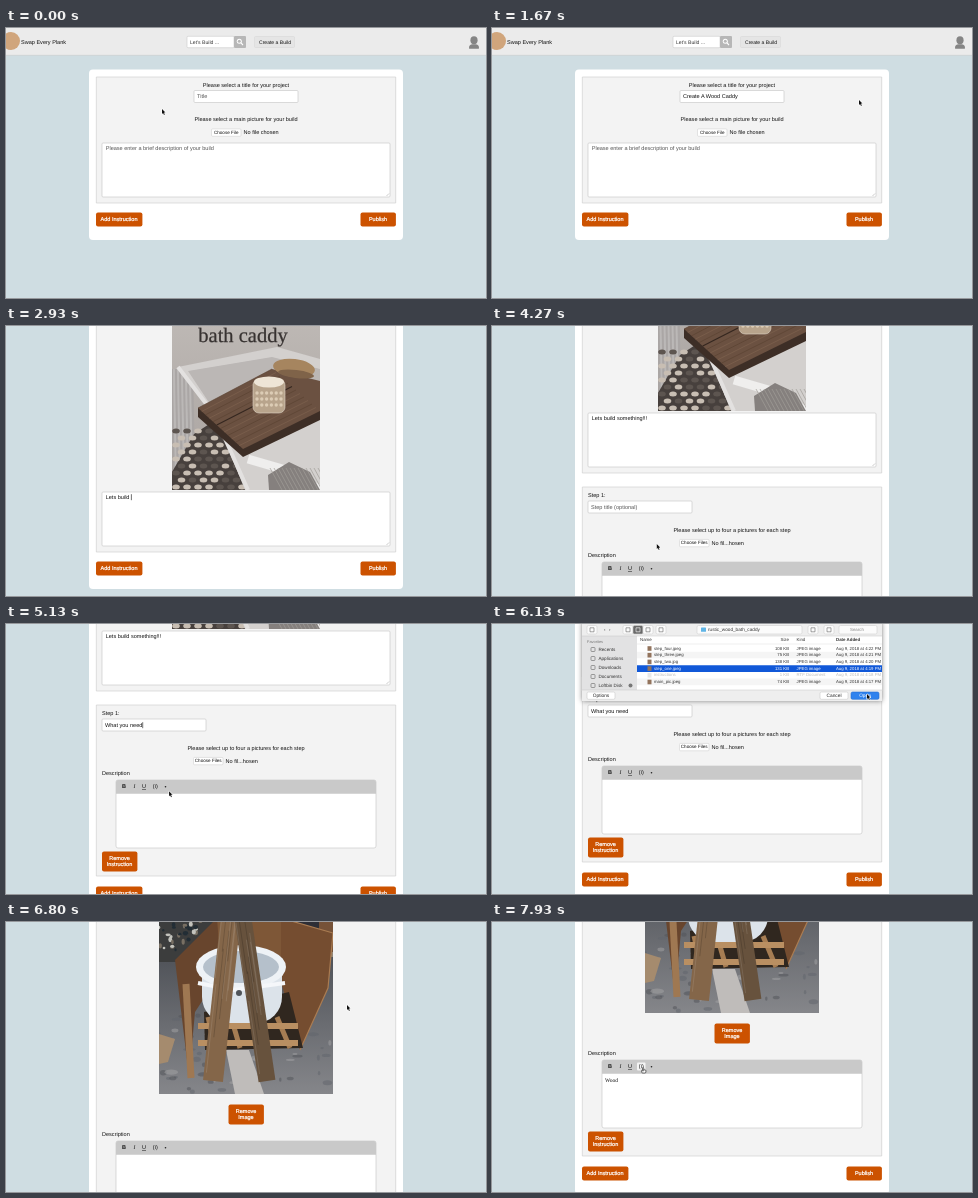
Recreate the animation shown at these times as an HTML page with a canvas. Size 480 by 270 pixels, loop 8000 ms.

```html
<!DOCTYPE html>
<html lang="en">
<head>
<meta charset="utf-8">
<title>Project form walkthrough</title>
<style>
  html, body { margin: 0; width: 100%; height: 100%; overflow: hidden; background: #cfdde2; }
  canvas { display: block; width: 480px; height: 270px; }
</style>
</head>
<body>
<canvas id="stage" width="480" height="270"></canvas>
<script>
const ctx = document.getElementById('stage').getContext('2d');
const SANS = '"Liberation Sans", Arial, sans-serif';
const SERIF = '"Liberation Serif", serif';
const LOOP = 8000, STEP = LOOP / 120;

// Moves end at the given time: [arrival, position...]
const SCROLL = [[0, 0], [2300, 182], [4200, 261], [5200, 355], [6466, 468], [6930, 640]];
const POINTER = [[0, 156, 81], [330, 215, 68], [1070, 218, 104], [1330, 185, 58], [1600, 367, 72],
  [2740, 190, 185], [3400, 112, 242], [4270, 170, 231], [4400, 150, 181], [5270, 205, 123],
  [5660, 180, 45], [6066, 375, 70], [6466, 341, 83], [7200, 180, 170], [7933, 151, 146]];

const TYPING = {
  title: { full: 'Create A Wood Caddy', start: 400, end: 860 },
  summary: { full: 'Lets build something!!!', start: 2740, end: 3160 },
  step: { full: 'What you need', start: 4470, end: 4900 },
  body: { full: 'Wood', start: 7267, end: 7533 },
};
const DIALOGS = [
  { open: 1140, pick: 1330, close: 1630, file: 'main_pic.jpeg' },
  { open: 5330, pick: 5660, close: 6190, file: 'step_one.jpeg' },
];

const clamp = u => Math.min(1, Math.max(0, u));
const mix = (a, b, u) => a + (b - a) * u;
const between = (t, a, b) => t >= a && t < b;
const random = seed => Math.abs(Math.sin(seed * 127.1) * 43758.5) % 1;

function glide(stops, t, duration) {
  return stops.reduce((from, [arrival, ...to]) => {
    const u = clamp(1 - (arrival - t) / duration);
    return to.map((v, i) => mix(from[i] ?? v, v, u * u * (3 - 2 * u)));
  }, []);
}

function box(x, y, w, h, fill, stroke, r = 0) {
  ctx.beginPath();
  ctx.roundRect(x, y, w, h, r);
  ctx.fillStyle = fill;
  ctx.fill();
  if (stroke) {
    ctx.strokeStyle = stroke;
    ctx.lineWidth = 0.6;
    ctx.stroke();
  }
}

function text(s, x, y, { size = 5.55, color = '#111', align = 'left', font = SANS, style = '', extra = 0 } = {}) {
  ctx.font = `${style} ${size}px ${font}`;
  ctx.textRendering = 'geometricPrecision';
  ctx.textAlign = align;
  ctx.textBaseline = 'middle';
  ctx.fillStyle = ctx.strokeStyle = color;
  ctx.fillText(s, x, y);
  if (extra) {
    ctx.lineWidth = extra;
    ctx.strokeText(s, x, y);
  }
  return ctx.measureText(s).width;
}

const centered = (s, x, y, look) => text(s, x, y, { ...look, align: 'center' });

function trace(points) {
  ctx.beginPath();
  for (let i = 0; i < points.length; i += 2) ctx.lineTo(points[i], points[i + 1]);
}

function poly(fill, ...points) {
  trace(points);
  ctx.fillStyle = fill;
  ctx.fill();
}

function line(color, width, ...points) {
  trace(points);
  ctx.strokeStyle = color;
  ctx.lineWidth = width;
  ctx.stroke();
}

function oval(fill, x, y, rx, ry = rx, turn = 0) {
  ctx.beginPath();
  ctx.ellipse(x, y, rx, ry, turn, 0, Math.PI * 2);
  ctx.fillStyle = fill;
  ctx.fill();
}

function shade(x, y, w, h, top, bottom) {
  const fill = ctx.createLinearGradient(0, y, 0, y + h);
  fill.addColorStop(0, top);
  fill.addColorStop(1, bottom);
  box(x, y, w, h, fill);
}

function photo(x, y, w, h, paint) {
  ctx.save();
  ctx.translate(x, y);
  ctx.beginPath();
  ctx.rect(0, 0, w, h);
  ctx.clip();
  paint(w, h);
  ctx.restore();
}

function plank(color, width, x1, y1, x2, y2) {
  line(color, width, x1, y1, x2, y2);
  for (let i = 0; i < 9; i++) {
    const shift = (random(i) - 0.5) * width * 0.9, a = random(i + 20) * 0.6;
    line(i % 2 ? '#0003' : '#fff2', 0.8, mix(x1, x2, a) + shift, mix(y1, y2, a),
      mix(x1, x2, a + 0.4) + shift, mix(y1, y2, a + 0.4));
  }
}

function speckle(count, x, y, w, h, colors) {
  for (let i = 0; i < count; i++)
    oval(colors[i % colors.length], x + random(i) * w, y + random(i + 99) * h,
      1 + random(i + 50) * w / 30, 1 + random(i + 70) * 2);
}

function caddyPhoto(w, h) {
  shade(0, 0, w, h, '#c4bfbb', '#a8a29f');
  for (let x = 0; x < 22; x += 2) line(x % 4 ? '#bbb8b7' : '#aaa6a5', 2.2, x, 100, x + 2, 205);
  poly('#47403d', 0, h, 0, 203, 22, 165, 45, 150, 80, h);
  for (let row = 0; row < 9; row++)
    for (let col = 0; col < 7; col++)
      oval(random(row * 7 + col) < 0.3 ? '#5d5550' : '#c8beb3', 4 + col * 11 + row % 2 * 5.5, 162 + row * 7, 3.8, 2.5);
  poly('#d3d0ce', 6, 98, 105, 78, w, 90, w, h, 73, h, 42, 145);
  poly('#bbb7b5', 16, 102, 100, 88, w, 100, w, 125, 48, 150);
  line('#e3e1e0', 4, 6, 98, 42, 145, 76, h);
  line('#efeeed', 9, 76, 190, 110, 200, w, h);
  poly('#3d2e26', 26, 139, w, 112, w, 151, 71, 188, 26, 148);
  poly('#6b5141', 26, 139, 100, 100, w, 112, w, 142, 71, 180);
  for (let i = 0; i < 12; i++) {
    const u = i / 12;
    line(i === 5 ? '#35271f' : i % 2 ? '#826651' : '#58412f', i === 5 ? 1.2 : 0.6,
      mix(26, 71, u), mix(139, 180, u), mix(100, w, u), mix(100, 142, u));
  }
  oval('#a6855f', 122, 99, 21, 9, 0.12);
  oval('#7f6349', 124, 105, 18, 4, 0.12);
  box(81, 110, 32, 34, '#b8a48c', '#dfd5c8', 6);
  oval('#eee5d6', 97, 113, 15, 5.5);
  for (let i = 0; i < 18; i++) oval('#dcccb5', 85 + i % 6 * 4.8, 124 + Math.floor(i / 6) * 6, 1.7);
  poly('#85807e', 96, 206, 117, 193, 138, 203, w, h, 97, h);
  for (let x = 98; x < w; x += 4) line('#a19c99', 0.7, x, 199, x + 12, h);
  centered('bath caddy', 71, 67.3, { size: 20.5, font: SERIF, color: '#373231', extra: 0.25 });
}

function garagePhoto(w, h) {
  shade(0, 0, w, 100, '#b9ab98', '#8f8373');
  shade(0, 95, w, h - 95, '#505359', '#85868a');
  speckle(70, 0, 150, w, 80, ['#62666c88', '#a1a2a488', '#52555a88']);
  box(0, 5, 42, 22, '#54331f');
  for (let x = 3; x < 38; x += 6) box(x, 10, 4, 10, x % 4 ? '#cfc5b4' : '#9b7350');
  box(0, 58, 55, 42, '#3c3d3d');
  speckle(35, 0, 55, 52, 38, ['#c3c3bd', '#222d35', '#786f63']);
  box(128, 3, 32, 80, '#2e2e35');
  box(160, 0, 14, 90, '#765238');
  line('#4b3527', 2, 117, 30, 117, 56);
  box(58, 56, 64, 48, '#7e5737');
  poly('#68452d', 16, 98, 58, 56, 62, 110, 36, 150, 30, 215);
  poly('#754d30', 122, 56, 174, 71, 169, 126, 141, 188, 122, 120);
  line('#aa7c52', 1.2, 122, 56, 174, 71, 169, 126, 141, 188);
  line('#9f7852', 7, 27, 122, 32, 216);
  poly('#30271f', 45, 150, 130, 130, 144, 186, 46, 188);
  for (let i = 0; i < 4; i++) line('#a67d53', 5, 49 + i * 23, 155, 56 + i * 25, 186);
  for (const y of [164, 181]) line('#b98f62', 6, 39, y, 139, y);
  box(43, 95, 80, 66, '#dce3ea', null, [8, 8, 26, 26]);
  oval('#eef2f6', 82, 105, 45, 22);
  oval('#b5c0cb', 82, 105, 38, 16);
  line('#f5f7fa', 4, 39, 121, 75, 128, 126, 121);
  oval('#505459', 80, 131, 3);
  poly('#bfbcba', 67, 188, 90, 188, 105, h, 76, h);
  poly('#a58b6e', 0, 172, 16, 177, 9, 200, 0, 202);
  plank('#846649', 20, 78, -2, 54, 219);
  plank('#67523d', 17, 81, 36, 108, 219);
}

function button(x, y, w, h, ...lines) {
  box(x, y - 0.4, w + 0.4, h + 0.8, '#cc5200', null, 2);
  lines.forEach((s, i) => centered(s, x + w / 2, y + h / 2 + 0.2 + (i - (lines.length - 1) / 2) * 6.4,
    { color: '#fff', extra: 0.22 }));
}

function fileRow(label, y, x, name) {
  box(x, y - 3.6, 29.5, 7.4, '#fff', '#d2d2d2', 1);
  centered(label, x + 14.7, y + 0.2, { size: 4.6 });
  text(name, x + 32, y);
}

function field({ full, start, end }, x, y, t, hint = '', font = SANS) {
  const value = full.slice(0, Math.round(full.length * clamp((t - start) / (end - start))));
  const width = text(value, x, y, { font });
  if (!value) text(hint, x, y, { color: '#555' });
  if (between(t, start - 70, end + 270)) line('#111', 0.6, x + width + 0.4, y - 3, x + width + 0.4, y + 3);
}

function header() {
  box(0, 0, 480, 27, '#ebebeb');
  line('#d0d0d0', 0.7, 0, 27.3, 480, 27.3);
  oval('#d0a57c', 5, 13, 9);
  text('Swap Every Plank', 15, 14);
  box(181, 8.3, 47, 11.4, '#fff', '#c9c9c9', 1);
  text("Let's Build ...", 184, 14.2, { size: 5.1, color: '#333' });
  box(228, 8, 12, 12, '#b7b7b7', null, 1);
  oval('#fff', 233.3, 13.2, 2.5);
  oval('#b7b7b7', 233.3, 13.2, 1.5);
  line('#fff', 1.1, 234.8, 14.7, 237, 17);
  box(248.5, 8.5, 40, 11, '#e5e5e5', '#d8d8d8', 1);
  text('Create a Build', 253, 14.2, { size: 5.05 });
  oval('#858585', 468, 12.3, 3.6, 4);
  box(463, 16.2, 10, 4.6, '#858585', null, [4, 4, 1, 1]);
}

function editor(y, t) {
  box(110, y, 260, 68, '#fff', '#c4c4c4', 2);
  box(110, y, 260, 13.7, '#c9c9c9', null, [2, 2, 0, 0]);
  if (t > 7900) box(145, y + 2.5, 8.5, 8, '#f4f4f4', null, 1);
  const mid = y + 6.7;
  centered('B', 118, mid, { style: 'bold' });
  centered('I', 128.5, mid, { style: 'italic', font: SERIF });
  centered('U', 138, mid);
  line('#111', 0.5, 136, mid + 2.8, 140, mid + 2.8);
  centered('(i)', 149.3, mid);
  oval('#222', 159.5, mid, 0.8);
  field(TYPING.body, 113, y + 20.7, t, '', SERIF);
}

function instruction(top, t, shift) {
  box(90.3, top, 299.4, 171 + shift, '#f3f3f3', '#c9c9c9');
  text('Step 1:', 96, top + 8.7);
  box(96, top + 14, 104, 12, '#fff', '#c5c5c5', 1);
  field(TYPING.step, 99, top + 20.2, t, 'Step title (optional)');
  centered('Please select up to four a pictures for each step', 240, top + 43.2);
  fileRow('Choose Files', top + 56, 187.5, shift ? 'step_one.jpeg' : 'No fil...hosen');
  if (shift) {
    centered('Picture Preview', 240, top + 74);
    photo(153, top + 77, 174, 232, garagePhoto);
    button(222.5, top + 320, 35, 19, 'Remove', 'Image');
  }
  text('Description', 96, top + 68.3 + shift);
  editor(top + 75 + shift, t);
  button(96, top + 147 + shift, 35, 19, 'Remove', 'Instruction');
}

function page(t) {
  const mainShift = t >= 1725 ? 233 : 0;
  const stepShift = t >= 6190 + STEP ? 281 : 0;
  const hasStep = t >= 3525;
  const stepTop = 189 + mainShift;
  const buttonsY = hasStep ? stepTop + 182 + stepShift : stepTop - 4;

  header();
  box(83, 41.5, 314, buttonsY - 14.5, '#fff', null, 4);
  box(90.3, 49, 299.4, 126 + mainShift, '#f3f3f3', '#c9c9c9');
  centered('Please select a title for your project', 240, 57.3);
  box(188, 62.5, 104, 12, '#fff', '#c5c5c5', 1);
  field(TYPING.title, 191, 68.6, t, 'Title');
  centered('Please select a main picture for your build', 240, 91.7);
  fileRow('Choose File', 104.5, 205.5, mainShift ? 'main_pic.jpeg' : 'No file chosen');
  if (mainShift) {
    centered('Picture Preview', 240, 122);
    photo(166, 125, 148, 221, caddyPhoto);
  }
  const summaryY = 115 + mainShift;
  box(96, summaryY, 288, 54, '#fff', '#c5c5c5', 1);
  line('#999', 0.5, 380.5, summaryY + 53, 383, summaryY + 50.5);
  field(TYPING.summary, 99.7, summaryY + 5.2, t, 'Please enter a brief description of your build');
  if (hasStep) instruction(stepTop, t, stepShift);
  button(90, buttonsY, 46, 13, 'Add Instruction');
  button(354.5, buttonsY, 35, 13, 'Publish');
}

function fileDialog(selected) {
  const small = { size: 4.4, color: '#333' };
  ctx.save();
  ctx.shadowColor = '#0007';
  ctx.shadowBlur = 5;
  box(90, -2, 300, 79, '#eee');
  ctx.restore();
  box(90, 12, 55, 54, '#e2e2e3');
  box(145, 12, 245, 54, '#fff');
  for (const y of [12, 66]) line('#c5c5c5', 0.5, 90, y, 390, y);

  for (const x of [95, 131, 141, 151, 164, 316, 332]) {
    const active = x === 141;
    box(x, 1.5, 10, 8.5, active ? '#696969' : '#fbfbfb', '#d0d0d0', 1.5);
    box(x + 3, 3.8, 4, 4, 'transparent', active ? '#fff' : '#666');
  }
  text('‹   ›', 112, 5.5, small);
  box(205, 1.5, 105, 8.5, '#fbfbfb', '#d0d0d0', 1.5);
  box(209, 3.5, 5, 4.3, '#60b5e6', null, 0.6);
  text('rustic_wood_bath_caddy', 216, 6, { ...small, size: 4.7 });
  box(347, 1.5, 38, 8.5, '#fbfbfb', '#d0d0d0', 1.5);
  text('Search', 358, 6, { ...small, color: '#888' });

  text('Favorites', 95, 18, { size: 3.9, color: '#777' });
  ['Recents', 'Applications', 'Downloads', 'Documents', 'Loftbin Disk'].forEach((s, i) => {
    const y = 25.5 + i * 9;
    box(99, y - 2, 4, 4, 'transparent', '#666', 0.8);
    text(s, 106.5, y, { ...small, size: 4.6 });
  });
  oval('#777', 138.5, 61.5, 2);

  text('Name', 148, 16, small);
  text('Size', 297, 16, { ...small, align: 'right' });
  text('Kind', 304.5, 16, small);
  text('Date Added', 344, 16, { ...small, style: 'bold' });
  line('#ddd', 0.5, 145, 20, 390, 20);
  const files = ['step_four.jpeg 108', 'step_three.jpeg 75', 'step_two.jpg 138',
    'step_one.jpeg 131', 'instructions 1', 'main_pic.jpeg 74'];
  files.forEach((entry, i) => {
    const [name, size] = entry.split(' ');
    const y = 24.5 + i * 6.7, picked = name === selected, faded = !name.includes('.');
    box(145, y - 3.4, 245, 6.7, picked ? '#1158d8' : i % 2 ? '#f5f5f5' : '#fff');
    const look = { size: 4.3, color: picked ? '#fff' : faded ? '#bbb' : '#333' };
    box(155.5, y - 2.3, 4, 4.6, faded ? '#e8e8e8' : '#92735c');
    text(name, 162, y, look);
    text(`${size} KB`, 297, y, { ...look, align: 'right' });
    text(faded ? 'RTF Document' : 'JPEG image', 304.5, y, look);
    text(`Aug 9, 2018 at 4:${22 - i} PM`, 344, y, look);
  });

  ['Options', 'Cancel', 'Open'].forEach((s, i) => {
    const x = i ? 297 + i * 31 : 95, main = s === 'Open' && selected;
    box(x, 68, 28, 7.3, main ? '#2f82ee' : '#fff', main ? '#226dd0' : '#c9c9c9', 1.5);
    centered(s, x + 14, 71.8, { size: 4.8, color: main ? '#fff' : '#222' });
  });
}

function dialogs(t) {
  const active = DIALOGS.find(d => between(t, d.open, d.close));
  if (!active) return;
  ctx.save();
  ctx.translate(0, -80 * (1 - clamp((t - active.open) / 130)));
  fileDialog(t >= active.pick && active.file);
  ctx.restore();
}

function pointer(t) {
  if (Object.values(TYPING).some(({ start, end }) => between(t, start, end + 70))) return;
  ctx.save();
  ctx.translate(...glide(POINTER, t, 200));
  if (t > 7900) {
    box(-1.3, 1.8, 4.2, 3.2, '#fff', '#111', 1);
    box(-0.6, -0.4, 1.3, 3.4, '#fff', '#111', 0.6);
  } else {
    const arrow = [0, 0, 0, 5, 1.1, 4, 2, 5.9, 2.8, 5.5, 1.9, 3.6, 3.5, 3.5];
    ctx.lineJoin = 'round';
    line('#fff', 1.1, ...arrow, 0, 0);
    poly('#111', ...arrow);
  }
  ctx.restore();
}

function frame(now) {
  const t = Math.floor((now % LOOP + 4) / STEP) * STEP % LOOP;
  box(0, 0, 480, 270, '#cfdde2');
  ctx.save();
  ctx.translate(0, -Math.round(glide(SCROLL, t, 270)[0]));
  page(t);
  ctx.restore();
  dialogs(t);
  pointer(t);
  requestAnimationFrame(frame);
}
requestAnimationFrame(frame);
</script>
</body>
</html>
```
